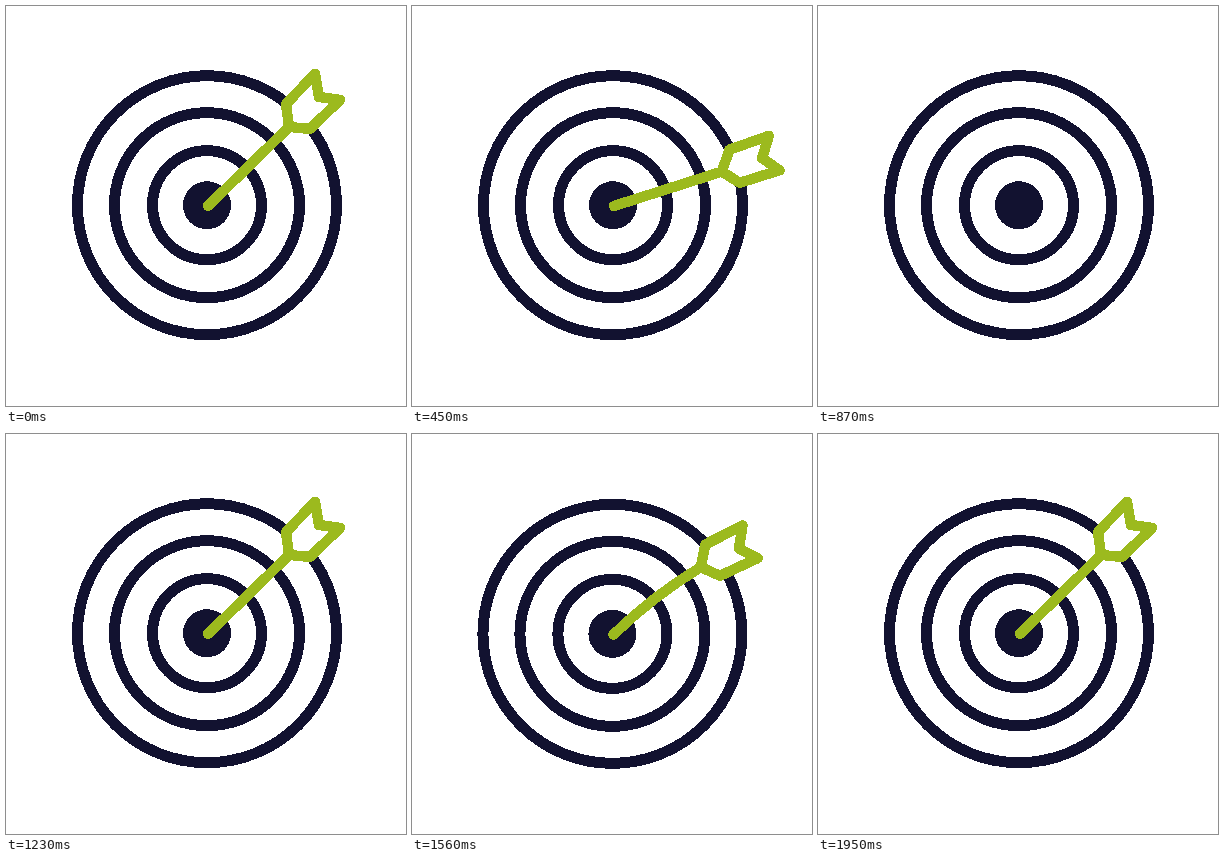
Write an HTML page that moves like this. It is 400x400 px and loops after 4010 ms.

```html
<!DOCTYPE html>
<html lang="en">
<head>
<meta charset="utf-8">
<title>Target and arrow</title>
<style>
  html, body { margin: 0; width: 100%; height: 100%; overflow: hidden; background: #fff; }
  svg { display: block; width: 100vw; height: 100vh; }
</style>
</head>
<body>
<svg viewBox="0 0 400 400" shape-rendering="crispEdges">
  <g id="target" fill="none" stroke="#121230" stroke-width="11">
    <circle cx="201" cy="199.2" r="129.5"/>
    <circle cx="201" cy="199.2" r="92.5"/>
    <circle cx="201" cy="199.2" r="54.5"/>
    <circle cx="201" cy="199.2" r="24" fill="#121230" stroke="none"/>
  </g>
  <g id="arrow" fill="none" stroke="#9cba1e" stroke-width="10.4" stroke-linecap="round" stroke-linejoin="round">
    <path id="shaft"/>
    <path id="head" fill="#fff" d="M0 0L-3-23L26-53L30-30L51-27L21 2Z"/>
  </g>
</svg>
<script>
const LOOP = 4010, STEP = 30;
const DROP_END = 870, FALL_START = 630, ENTER = 1200, HIT = 1230, PUSHED = 1350, BACK = 1600, REST = 1950;
const PIVOT = { x: 202, y: 200 };
const SHAFT = { length: 113.2, angle: -44.3 };

const [target, arrow, shaft, head] =
  ['target', 'arrow', 'shaft', 'head'].map(id => document.getElementById(id));

const rad = deg => deg * Math.PI / 180;
const progress = (t, from, to) => Math.min(1, Math.max(0, (t - from) / (to - from)));
const smooth = u => u * u * (3 - 2 * u);

// Cubic Bezier easing with flat ends, solved by bisection.
function ease(x, x1, x2) {
  let low = 0, high = 1;
  for (let i = 0; i < 30; i++) {
    const u = (low + high) / 2, v = 1 - u;
    if (3 * u * v * v * x1 + 3 * u * u * v * x2 + u * u * u < x) low = u;
    else high = u;
  }
  return smooth(low);
}

// Damped swing of the stuck arrow.
function swing(t, size, decay, peak, period) {
  if (t <= HIT || t >= REST) return 0;
  const envelope = Math.pow(1 - progress(t, HIT, REST), decay);
  return size * envelope * smooth(progress(t, HIT, 1300)) * Math.cos(2 * Math.PI * (t - peak) / period);
}

function drawArrow(tilt, bend) {
  const angle = rad(SHAFT.angle + tilt);
  const length = SHAFT.length * (1 - 0.002 * Math.abs(bend));
  const x = length * Math.cos(angle), y = length * Math.sin(angle);
  const bow = 0.52 * bend;
  const cx = x / 2 + bow * Math.sin(angle), cy = y / 2 - bow * Math.cos(angle);
  shaft.setAttribute('d', `M0 0Q${cx} ${cy} ${x} ${y}`);
  head.setAttribute('transform', `translate(${x} ${y}) rotate(${tilt + bend})`);
}

function render(t) {
  let tilt = 0, bend = 0, dx = 0, dy = 0;
  let push = 0;

  if (t < DROP_END) {
    tilt = 160 * ease(t / DROP_END, 0.98, 0.55);
    dy = 208 * progress(t, FALL_START, DROP_END) ** 2;
  } else {
    const rise = progress(t, HIT, PUSHED);
    push = rise * (2 - rise) * (1 - smooth(progress(t, PUSHED, BACK)));
    const distance = 59 * (1 - progress(t, ENTER, HIT));
    dx = distance - 8.2 * push;
    dy = 9.5 * push - distance;
    tilt = swing(t, 19.3, 1.75, 1350, 210);
    bend = swing(t, 30.7, 1.4, 1380, 190);
  }

  target.setAttribute('transform', `translate(${-8.2 * push} ${9.5 * push})`);
  arrow.setAttribute('transform', `translate(${PIVOT.x + dx} ${PIVOT.y + dy})`);
  arrow.setAttribute('visibility', t >= DROP_END && t < ENTER ? 'hidden' : 'visible');
  drawArrow(tilt, bend);
}

const start = performance.now();
function tick() {
  const t = (performance.now() - start) % LOOP;
  render(Math.floor(t / STEP) * STEP);
  requestAnimationFrame(tick);
}
tick();
</script>
</body>
</html>
```
